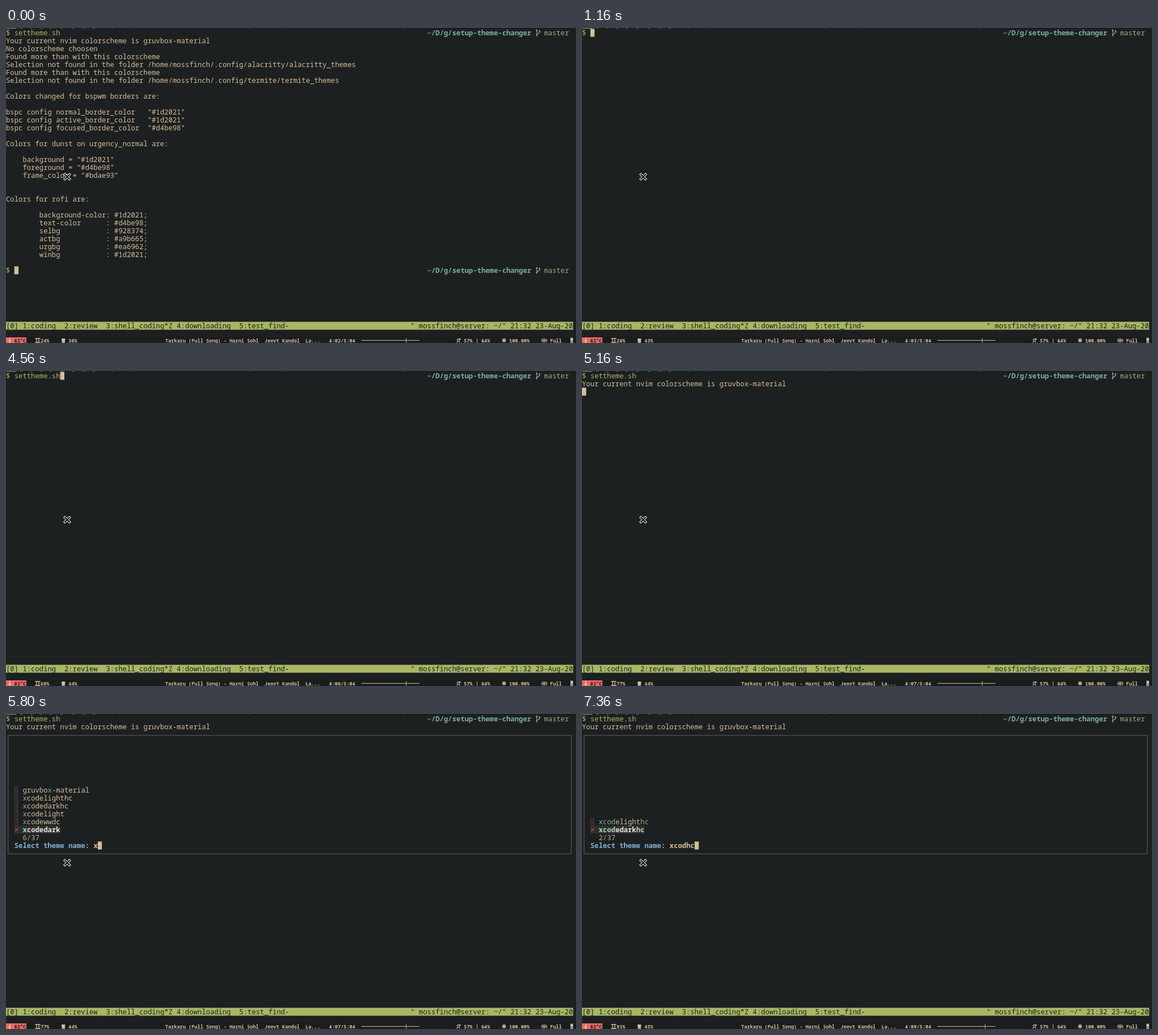
An HTML page for the animation above (8 s loop, 1006 by 557 pixels).

```html
<!DOCTYPE html>
<html lang="en">
<head>
<meta charset="utf-8">
<title>Theme changer</title>
<style>
  html, body { margin: 0; width: 100%; height: 100%; overflow: hidden; background: #1d2021; }
  svg { display: block; width: 1006px; height: 557px; }
  text { white-space: pre; font: 12.267px "Noto Sans Mono", "DejaVu Sans Mono", monospace; }
  .b { font-weight: 700; }
  .bar text { font-size: 8.6px; font-weight: 700; }
</style>
</head>
<body>
<svg viewBox="0 0 1006 557">
  <rect width="1006" height="557" fill="#1d2021"/>
  <g id="edge"></g>
  <g id="term"></g>
  <g id="status"></g>
  <g id="bar" class="bar"></g>
  <g fill="none" stroke-linecap="square">
    <path d="M104 259l8 8m0-8l-8 8" stroke="#eee" stroke-width="4.2"/>
    <path d="M104 259l8 8m0-8l-8 8" stroke="#111" stroke-width="2.2"/>
  </g>
</svg>
<script>
const LOOP = 8000, CW = 7.36, RH = 14, TOP = 1.5;
const C = {
  bg: '#1d2021', fg: '#d4be98', green: '#a9b665', path: '#7daea3', branch: '#89b482',
  dim: '#7c6f64', gutter: '#303030', border: '#5f5f5f', prompt: '#87afd7',
  info: '#afaf87', match: '#87af87', matchSel: '#afd7af', sel: '#e4e4e4', pointer: '#e8383d'
};
const USER = 'mossfinch', CMD = 'settheme.sh';
const SONG = 'Tarkaru (Full Song) - Harni Sohl  Jeevt Kandol  La...';
const $ = id => document.getElementById(id);
const esc = s => s.replace(/&/g, '&amp;').replace(/</g, '&lt;').replace(/>/g, '&gt;');

const box = (x, y, w, h, fill) => `<rect x="${x}" y="${y}" width="${w}" height="${h}" fill="${fill}"/>`;
const label = (x, y, s, fill, cls = '') => `<text x="${x}" y="${y}" fill="${fill}" class="${cls}">${esc(s)}</text>`;
const put = (col, row, s, fill = C.fg, cls) => label(+(col * CW).toFixed(2), TOP + row * RH + 11.2, s, fill, cls);
const block = (col, row, n, fill) => box(+(col * CW).toFixed(2), TOP + row * RH, n * CW, RH, fill);
const caret = (col, row) => block(col, row, 1, C.fg);

function prompt(row) {
  const y = TOP + row * RH;
  return put(0, row, '$', C.green) +
    put(101, row, '~/D/g/setup-theme-changer', C.path, 'b') +
    `<path d="M936.8 ${y + 3.5}v8M936.8 ${y + 9}q5 -.4 5 -4" fill="none" stroke="${C.branch}" stroke-width="1.2"/>` +
    [[936.8, 2.8], [936.8, 11.4], [941.8, 4.2]].map(([x, dy]) =>
      `<circle cx="${x}" cy="${y + dy}" r="1.4" fill="${C.branch}"/>`).join('') +
    put(129, row, 'master', C.branch);
}

const REPORT = `Your current nvim colorscheme is gruvbox-material
No colorscheme choosen
Found more than with this colorscheme
Selection not found in the folder /home/${USER}/.config/alacritty/alacritty_themes
Found more than with this colorscheme
Selection not found in the folder /home/${USER}/.config/termite/termite_themes

Colors changed for bspwm borders are:

bspc config normal_border_color   "#1d2021"
bspc config active_border_color   "#1d2021"
bspc config focused_border_color  "#d4be98"

Colors for dunst on urgency_normal are:

    background = "#1d2021"
    foreground = "#d4be98"
    frame_color = "#bdae93"


Colors for rofi are:

        background-color: #1d2021;
        text-color      : #d4be98;
        selbg           : #928374;
        actbg           : #a9b665;
        urgbg           : #ea6962;
        winbg           : #1d2021;`.split('\n');

const ALL = 'SlateDark blue darkblue default delek desert elflord evening industry inkpot koehler lucario'.split(' ');
const FOUND = 'xcodedark xcodewwdc xcodelight xcodedarkhc xcodelighthc gruvbox-material'.split(' ');

function menu(query) {
  const head = query.slice(0, 4), tail = query.slice(4);
  const names = query ? FOUND.filter(n => n.includes(head) && n.slice(4).includes(tail)) : ALL;
  let out = `<rect x="3.7" y="37.8" width="994" height="209.4" fill="none" stroke="${C.border}"/>`;
  names.forEach((name, i) => {
    const row = 14 - i, cls = i ? '' : 'b';
    out += block(2, row, i ? 1 : name.length + 2, C.gutter);
    if (!i) out += put(2, row, '>', C.pointer, 'b');
    const a = name.indexOf(head), z = tail ? name.lastIndexOf(tail) : name.length;
    const parts = [[0, a, 0], [a, a + head.length, 1], [a + head.length, z, 0], [z, name.length, 1]];
    for (const [from, to, hit] of parts) {
      if (to <= from) continue;
      const fill = hit ? (i ? C.match : C.matchSel) : (i ? C.fg : C.sel);
      out += put(4 + from, row, name.slice(from, to), fill, cls);
    }
  });
  return out + put(4, 15, (query ? names.length : 37) + '/37', C.info) +
    put(2, 16, 'Select theme name:', C.prompt, 'b') +
    put(21, 16, query, C.fg, 'b') + caret(21 + query.length, 16);
}

const screens = {
  report: () => prompt(0) + put(2, 0, CMD, C.green) +
    REPORT.map((s, i) => s && put(0, i + 1, s)).join('') + prompt(30) + caret(2, 30),
  typing({ typed }) {
    const n = typed, col = 2 + n;
    if (!n) return prompt(0) + caret(2, 0);
    if (n === CMD.length) return prompt(0) + put(2, 0, CMD, C.green) + caret(col, 0);
    return prompt(0) + put(2, 0, CMD.slice(0, n), C.fg) + box(2 * CW, 13.6, n * CW, 1, C.fg) +
      put(col, 0, CMD.slice(n), C.dim) + block(col, 0, 1, '#a3947b') + put(col, 0, CMD[n], '#504a42');
  },
  running: () => prompt(0) + put(2, 0, CMD, C.green) + put(0, 1, REPORT[0]) + caret(0, 2),
  menu: ({ query }) => prompt(0) + put(2, 0, CMD, C.green) + put(0, 1, REPORT[0]) + menu(query)
};

function bar({ cpu, mem, sec }) {
  const y = 555.6, f = C.fg;
  const tick = sec < 8 ? 706.3 : 711.5;
  const spokes = [0, 45, 90, 135].map(a =>
    `<path d="M875.2 552.3h7.6" transform="rotate(${a} 879 552.3)"/>`).join('');
  return box(0, 546, 1006, 11, '#1a1d1e') + box(0, 547, 36, 10, '#ea6962') +
    '<path d="M6.5 549v5" stroke="#f5b5a0" stroke-width="2" stroke-linecap="round"/><circle cx="6.5" cy="554.5" r="2" fill="#f5b5a0"/>' +
    label(14.5, y, '82°C', C.bg) +
    `<path d="M51.5 549h9M51.5 556h9M54 549v7M58 549v7" stroke="${f}" stroke-width="1.3"/>` +
    label(61, y, cpu + '%', f) +
    box(98.5, 549, 5.5, 7.5, f) + box(97.7, 550.5, 7, 1, f) +
    label(110.3, y, mem + '%', f) +
    label(281, y, SONG, f) + label(570, y, `4:0${sec}/5:04`, f) +
    `<path d="M627 552.4H729.5M${tick} 548.5v8" stroke="${f}"/>` +
    `<path d="M795.5 552l3-2.5 3 1.5-2.5 2.5 2 2.5M798 553l-2.5 3M800.5 549l2 1" fill="none" stroke="${f}" stroke-width="1.2"/>` +
    label(808, y, '57% | 64%', f) +
    `<g fill="none" stroke="${f}">${spokes}<circle cx="879" cy="552.3" r="2.4"/></g>` +
    label(888, y, '100.00%', f) +
    `<rect x="945.5" y="550" width="8.5" height="5" rx="1" fill="none" stroke="${f}"/>` +
    box(947, 551.5, 5.5, 2, f) + box(954.5, 551.5, 1, 2, f) +
    label(960.3, y, 'Full', f) +
    box(996, 547.5, 5, 9.5, '#8c9190') + box(997, 549, 3, 3, '#d5d8d6');
}

// Slivers of the bar above the terminal
$('edge').innerHTML = box(0, 0, 1006, 1, '#161819') + box(0, 0, 18, 1, '#a89984') +
  [27, 45, 62, 79, 98, 119, 138, 155].map(x => box(x - 2, 0, 4, 1, '#6b6052')).join('') +
  [187, 224, 428, 493, 702, 935].map(x => box(x, 0, 2, 1, '#5a5147')).join('');

$('status').innerHTML = block(0, 37, 136, C.green) +
  put(0, 37, '[0] 1:coding  2:review  3:shell_coding*Z 4:downloading  5:test_find-', C.bg) +
  put(97, 37, `" ${USER}@server: ~/" 21:32 23-Aug-20`, C.bg);

const STEPS = [
  [0, { view: 'report', typed: 0, query: '', cpu: 24, mem: 36, sec: 2 }],
  [320, { view: 'typing' }],
  [720, { sec: 3 }],
  [1160, { cpu: 26, mem: 43 }],
  [3480, { typed: 5, cpu: 68, mem: 44, sec: 5 }],
  [3720, { typed: 8 }],
  [3960, { sec: 6 }],
  [4200, { typed: 9 }],
  [4560, { typed: 11 }],
  [4840, { view: 'running' }],
  [5160, { cpu: 77, sec: 7 }],
  [5480, { view: 'menu' }],
  [5800, { query: 'x' }],
  [6080, { query: 'xc', sec: 8 }],
  [6360, { query: 'xcod', mem: 45 }],
  [7080, { query: 'xcodhc', sec: 9 }],
  [7360, { cpu: 91 }]
];

let shown = -1;
function draw(t) {
  const past = STEPS.filter(([at]) => at <= t);
  if (past.length === shown) return;
  shown = past.length;
  const state = Object.assign({}, ...past.map(s => s[1]));
  $('term').innerHTML = screens[state.view](state);
  $('bar').innerHTML = bar(state);
}

const start = performance.now();
function tick() {
  draw((performance.now() - start) % LOOP);
  requestAnimationFrame(tick);
}
tick();
</script>
</body>
</html>
```
